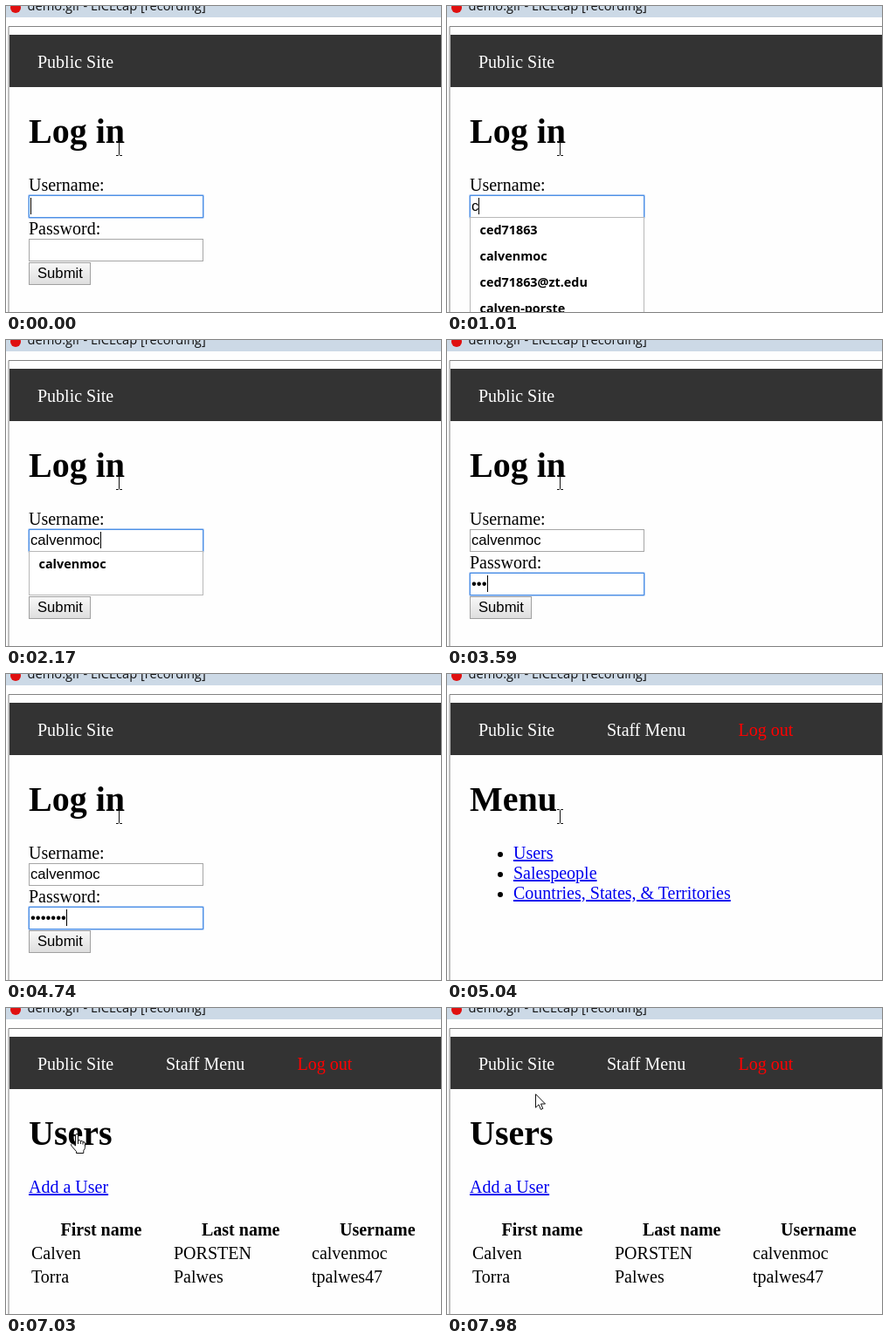
Recreate the animation shown at these times as an HTML page. Size 498x351 px, loop 8 s.

```html
<!DOCTYPE html>
<html lang="en">
<head>
<meta charset="utf-8">
<title>Log in</title>
<style>
  html, body { margin: 0; width: 100%; height: 100%; overflow: hidden; background: #fefefe; }
  svg { display: block; width: 498px; height: 351px; }
  text { white-space: pre; }
  .page { font: 20px "Liberation Serif", serif; }
  .title { font: bold 40px "Liberation Serif", serif; }
  .bold { font-weight: bold; }
  .link { fill: #0000ee; text-decoration: underline; }
  .field { font: 16.67px "Liberation Sans", sans-serif; }
  .list { font: bold 14.4px "Open Sans", "Noto Sans", sans-serif; }
  .caption { font: 14.65px "Open Sans", "Noto Sans", sans-serif; fill: #111; }
  .box { fill: #fff; stroke: #a6a6a6; }
  .box.focus { stroke: #4d90e6; }
</style>
</head>
<body>
<svg viewBox="0 0 498 351">
  <defs>
    <linearGradient id="face" x2="0" y2="1">
      <stop stop-color="#f8f8f8"/><stop offset="1" stop-color="#dedede"/>
    </linearGradient>
  </defs>
  <rect width="498" height="351" fill="#fefefe"/>
  <rect width="498" height="13" fill="#ccd9e6"/>
  <circle cx="11" cy="2" r="6" fill="#e01010"/>
  <text class="caption" x="24.5" y="5">demo.gif - LICEcap [recording]</text>
  <path d="M498 23.5H3V351" fill="none" stroke="#828282"/>

  <g class="page">
    <rect x="4" y="33" width="494" height="60" fill="#333"/>
    <text x="36" y="71" fill="#fff">Public Site</text>
    <g id="staff">
      <text x="183" y="71" fill="#fff">Staff Menu</text>
      <text x="333.5" y="71" fill="red">Log out</text>
    </g>
    <text id="heading" class="title" x="26" y="157"></text>

    <g id="login">
      <text x="26" y="212">Username:</text>
      <text x="26" y="262">Password:</text>
      <rect id="userBox" class="box" x="26.5" y="217.5" width="199" height="25"/>
      <rect id="passBox" class="box" x="26.5" y="267.5" width="199" height="25"/>
      <rect id="halo" x="25.5" width="201" height="27" rx="1" fill="none" stroke="#a9c8f2"/>
      <rect x="26.5" y="294.5" width="70" height="25" fill="url(#face)" stroke="#a0a0a0"/>
      <g class="field">
        <text x="36" y="312">Submit</text>
        <text id="user" x="28" y="235"></text>
        <text id="pass" x="28" y="285"></text>
      </g>
      <rect id="caret" width="1" height="19"/>
      <g id="drop" class="list">
        <rect id="dropBox" x="26.5" y="242.5" width="199" fill="#fff" stroke="#b8b8b8"/>
        <g id="items"></g>
      </g>
    </g>

    <g id="menu">
      <circle cx="61" cy="207" r="3"/><circle cx="61" cy="230" r="3"/><circle cx="61" cy="253" r="3"/>
      <text class="link" x="76" y="212">Users</text>
      <text class="link" x="76" y="235">Salespeople</text>
      <text class="link" x="76" y="258">Countries, States, &amp; Territories</text>
    </g>

    <g id="users">
      <text class="link" x="26" y="212">Add a User</text>
      <g class="bold">
        <text x="62.5" y="261">First name</text><text x="224" y="261">Last name</text><text x="382" y="261">Username</text>
      </g>
      <text x="29" y="288">Calven</text><text x="192" y="288">PORSTEN</text><text x="350" y="288">calvenmoc</text>
      <text x="29" y="315">Torra</text><text x="192" y="315">Palwes</text><text x="350" y="315">tpalwes47</text>
    </g>
  </g>

  <g id="ibeam" fill="none" stroke="#111">
    <path d="M0 .5H2.5L3.5 1.5 4.5 .5H7M3.5 1.5V15.5M0 16.5H2.5L3.5 15.5 4.5 16.5H7"/>
  </g>
  <g id="hand" fill="#fff" stroke="#111" stroke-linejoin="round">
    <path d="M5.5 14V2.2Q5.5.5 7 .5T8.5 2.2V8Q11 6.8 11.3 8.7 13.6 7.6 14 9.6 16.5 9 16.5 11.5V15.5Q16.5 17.5 14.8 19.5V22.5H6.5V20.5L1 14.2Q-.2 12.3 1.5 11.6 3 11.2 5.5 14ZM8.5 8V12M11.3 8.7V12M14 9.6V12.5"/>
  </g>
  <g id="arrow" fill="#fff" stroke="#111">
    <path d="M.5 .8V16.2L4 12.8 6.4 18.4 8.8 17.4 6.5 12H11.5Z"/>
  </g>
</svg>
<script>
const LOOP = 8000;
const NAME = "calvenmoc";
const ALL = ["ced71863", NAME, "ced71863@zt.edu", "calven-porste"];
const $ = id => document.getElementById(id);
const show = (id, on) => { $(id).style.display = on ? "" : "none"; };

// Each step: [start time, value...]
const userSteps = [[0, 0], [1010, 1], [1150, 2], [1300, 3], [1440, 4], [1730, 6], [1870, 7], [2020, 8], [2170, 9]];
const passSteps = [[0, 0], [3160, 1], [3440, 2], [3590, 3], [3850, 4], [3970, 5], [4290, 6], [4740, 7], [4890, 8]];
const caretSteps = [[0, true], [280, false], [860, true], [2870, false], [3160, true]];
const pointerSteps = [
  [0, "ibeam", 126, 155], [5880, "ibeam", 116, 171],
  [6020, "hand", 97, 192], [6160, "hand", 91, 178], [6300, "hand", 83, 148],
  [6460, "hand", 80, 147], [6600, "hand", 78, 146], [6740, "hand", 76, 145], [6880, "hand", 74, 144],
  [7710, "ibeam", 88, 125], [7850, "arrow", 98, 108], [7980, "arrow", 101, 98]
];
const at = (steps, t) => steps.findLast(step => step[0] <= t).slice(1);

function drawLogin(t) {
  const [typed] = at(userSteps, t), [dots] = at(passSteps, t), [blink] = at(caretSteps, t);
  const onUser = t < 2310;
  $("user").textContent = NAME.slice(0, typed);
  $("pass").textContent = "•".repeat(dots);
  $("userBox").classList.toggle("focus", onUser);
  $("passBox").classList.toggle("focus", !onUser);
  $("halo").setAttribute("y", onUser ? 216.5 : 266.5);

  const active = $(onUser ? "user" : "pass");
  const width = active.textContent ? active.getComputedTextLength() : 0;
  $("caret").setAttribute("x", 28 + Math.round(width));
  $("caret").setAttribute("y", onUser ? 220 : 270);
  show("caret", blink);

  const open = onUser && typed > 0;
  show("drop", open);
  if (!open) return;
  const matches = ALL.filter(item => item.startsWith(NAME.slice(0, typed)));
  $("dropBox").setAttribute("height", Math.max(50, matches.length * 30 + 1));
  $("items").innerHTML = matches.map((item, i) => `<text x="37.5" y="${262 + i * 30}">${item}</text>`).join("");
}

function draw(t) {
  const page = t < 5040 ? "login" : t < 7030 ? "menu" : "users";
  for (const id of ["login", "menu", "users"]) show(id, id === page);
  show("staff", page !== "login");
  $("heading").textContent = { login: "Log in", menu: "Menu", users: "Users" }[page];
  if (page === "login") drawLogin(t);

  const [shape, x, y] = at(pointerSteps, t);
  for (const id of ["ibeam", "hand", "arrow"]) show(id, id === shape);
  $(shape).setAttribute("transform", `translate(${x} ${y})`);
}

const start = performance.now();
function tick() {
  draw((performance.now() - start) % LOOP);
  requestAnimationFrame(tick);
}
tick();
</script>
</body>
</html>
```
